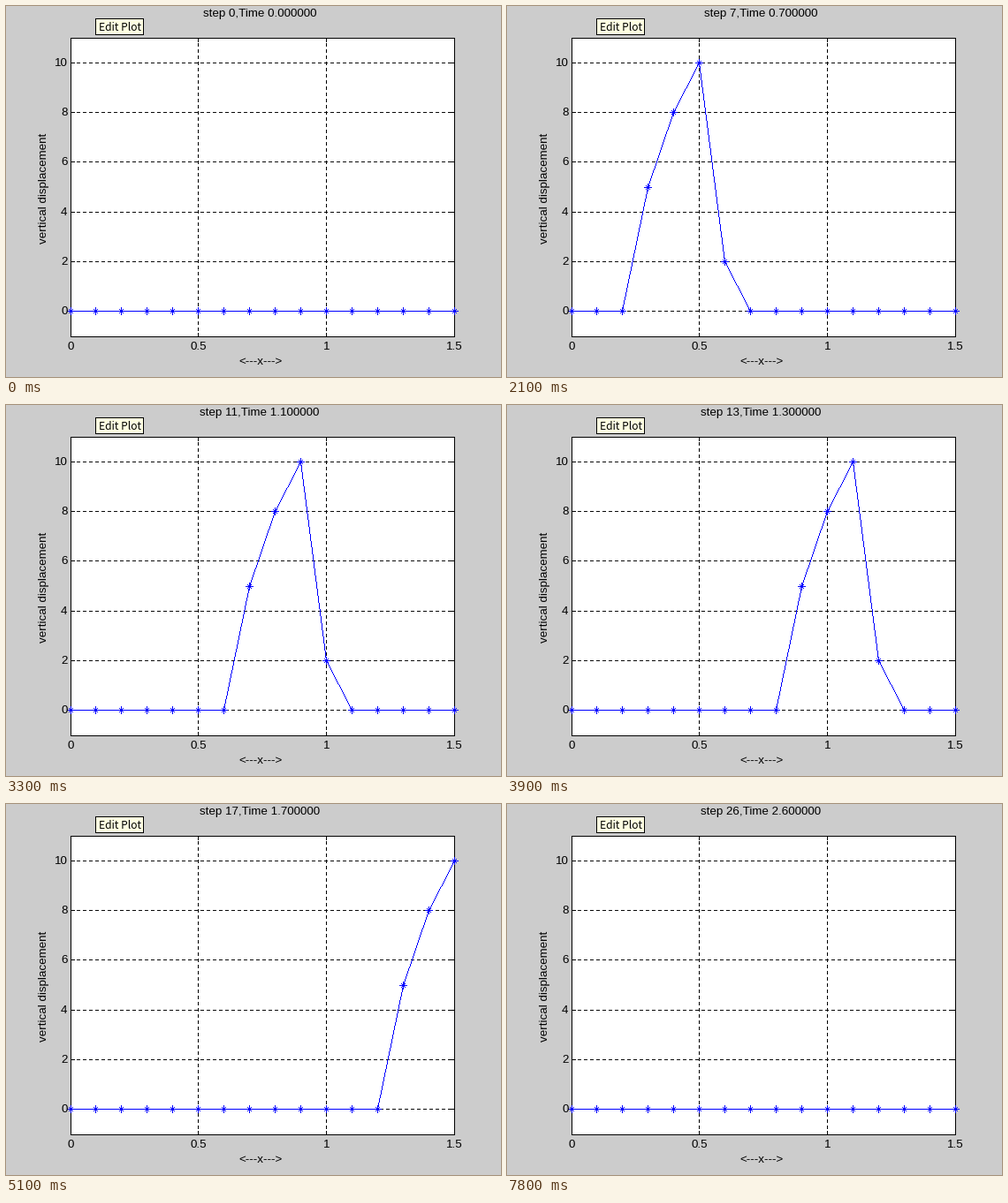
These frames come from a looping animation (560 px wide and 420 px high, 8000 ms). A matplotlib script:

```python
import matplotlib as mpl
import matplotlib.pyplot as plt
import numpy as np
from matplotlib.animation import FuncAnimation

WIDTH, HEIGHT = 560, 420
LEFT, RIGHT, TOP, BOTTOM = 73, 507, 36, 374
NODES = 16
PULSE = (2, 10, 8, 5)
TICK_MS, TICKS_PER_STEP, LOOP_MS = 100, 3, 8000

BLACK, WHITE, BLUE = (0, 0, 0), (255, 255, 255), (0, 0, 255)
GREY, CREAM = (204, 204, 204), (255, 255, 225)

mpl.rcParams.update({
    "toolbar": "None",
    "font.family": "Liberation Sans",
    "font.size": 13.33,
})

fig = plt.figure(figsize=(WIDTH / 72, HEIGHT / 72), dpi=72, facecolor="#cccccc")
ax = fig.add_axes([0, 0, 1, 1])
ax.set(xlim=(0, WIDTH), ylim=(HEIGHT, 0))
ax.axis("off")


def px(x):
    return int(LEFT + (RIGHT - LEFT) * x / 1.5 + 1e-6)


def py(y):
    return int(BOTTOM - (BOTTOM - TOP) * (y + 1) / 12 + 1e-6)


def line(canvas, x0, y0, x1, y1, color=BLACK, dash=None):
    """Hard-edged line, one pixel per step along its longer direction."""
    steps = np.arange(max(abs(x1 - x0), abs(y1 - y0)) + 1)
    part = steps / steps[-1]
    if dash:
        on, off = dash
        part = part[steps % (on + off) < on]
    xs = np.floor(x0 + (x1 - x0) * part + 0.5).astype(int)
    ys = np.floor(y0 + (y1 - y0) * part + 0.5).astype(int)
    canvas[ys, xs] = color


def box(canvas, x0, y0, x1, y1, fill):
    canvas[y0:y1 + 1, x0:x1 + 1] = fill
    for edge in ((x0, y0, x1, y0), (x0, y1, x1, y1),
                 (x0, y0, x0, y1), (x1, y0, x1, y1)):
        line(canvas, *edge)


def star(canvas, x, y):
    for dx, dy in ((4, 0), (0, 4), (2, 2), (2, -2)):
        line(canvas, x - dx, y - dy, x + dx, y + dy, BLUE)


def label(x, y, text, ha="center", va="baseline", **style):
    return ax.text(x, y, text, ha=ha, va=va, **style)


def displacement(step):
    ages = (step - 1 - node for node in range(NODES))
    return [PULSE[age] if 0 <= age < len(PULSE) else 0 for age in ages]


def draw_background():
    canvas = np.full((HEIGHT, WIDTH, 3), GREY, dtype=np.uint8)
    box(canvas, LEFT, TOP, RIGHT, BOTTOM, WHITE)
    dash = (4, 3)
    for value in (0, 0.5, 1, 1.5):
        x = px(value)
        line(canvas, x, BOTTOM, x, TOP, dash=dash)
        line(canvas, x, BOTTOM, x, BOTTOM - 4)
        line(canvas, x, TOP, x, TOP + 4)
        label(x + 0.5, 389, f"{value:g}")
    for value in range(0, 11, 2):
        y = py(value)
        line(canvas, LEFT, y, RIGHT, y, dash=dash)
        line(canvas, LEFT, y, LEFT + 4, y)
        line(canvas, RIGHT, y, RIGHT - 4, y)
        label(69.5, y + 4, f"{value}", ha="right")
    label(288.5, 406, "<---x--->")
    label(49, 206.5, "vertical displacement", ha="right", va="center",
          rotation=90)
    box(canvas, 101, 14, 155, 32, CREAM)
    label(105, 28, "Edit Plot", ha="left", family="Noto Sans CJK JP", size=12)
    return canvas


background = draw_background()
picture = ax.imshow(background, extent=(0, WIDTH, HEIGHT, 0), aspect="auto",
                    interpolation="nearest")
title = label(287, 12, "")
node_x = [px(node / 10) for node in range(NODES)]


def update(tick):
    step = tick // TICKS_PER_STEP
    canvas = background.copy()
    points = list(zip(node_x, map(py, displacement(step))))
    for start, end in zip(points, points[1:]):
        line(canvas, *start, *end, BLUE)
    for point in points:
        star(canvas, *point)
    picture.set_data(canvas)
    title.set_text(f"step {step},Time {step / 10:.6f}")
    return picture, title


anim = FuncAnimation(fig, update, frames=LOOP_MS // TICK_MS, interval=TICK_MS,
                     init_func=lambda: update(0), repeat=True, repeat_delay=0)
plt.show()
```
